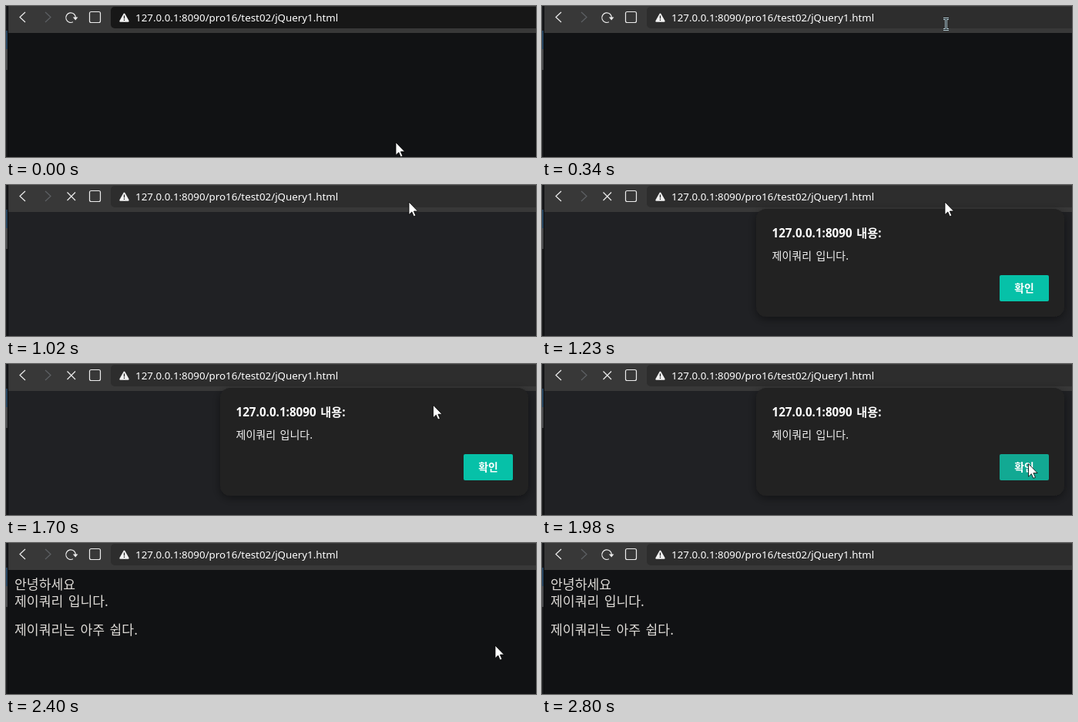
An HTML page that plays this animation: 688 by 196 pixels, repeating every 3000 ms.

```html
<!DOCTYPE html>
<html lang="ko">
<head>
<meta charset="utf-8">
<title>Alert demo</title>
<style>
  html, body { margin: 0; width: 100%; height: 100%; overflow: hidden; background: #111214; }
  svg { display: block; width: 688px; height: 196px; }
  text { font-family: "Noto Sans", "Noto Sans CJK KR", "Noto Sans CJK", sans-serif; white-space: pre; word-spacing: 1.6px; }
  .ko { font-family: "Noto Sans CJK KR", "Noto Sans CJK", sans-serif; }
  .line { fill: none; stroke: #ececec; stroke-width: 1.2; }
</style>
</head>
<body>
<svg viewBox="0 0 688 196" lang="ko">
  <defs>
    <filter id="shade" x="-10%" y="-20%" width="120%" height="150%">
      <feDropShadow dx="0" dy="3" stdDeviation="6" flood-color="#000" flood-opacity=".45"/>
    </filter>
  </defs>
  <rect id="page" width="688" height="196"/>
  <rect width="688" height="35" fill="#383838"/>

  <!-- neighbouring window edge -->
  <rect width="2" height="196" fill="#1b1c1e"/>
  <rect y="32" width="2" height="24" fill="#274560"/>
  <rect y="56" width="2" height="27" fill="#4a4b4d"/>
  <rect x="2" width="1" height="196" fill="#0b0c0d"/>

  <path class="line" d="M25 8L18 14.5L25 21"/>
  <path class="line" d="M51 8L58 14.5L51 21" style="stroke:#5d6064"/>
  <g id="reload" transform="translate(-.6 0)">
    <path class="line" d="M87.5 20.8A6.3 6.3 0 1 1 91 15"/>
    <path d="M87.4 14.6H94L90.8 18.6Z" fill="#ececec"/>
  </g>
  <path id="stop" class="line" d="M79.5 9.5L90 20M90 9.5L79.5 20"/>
  <rect class="line" x="108.5" y="7.5" width="14" height="14" rx="2"/>

  <rect id="bar" x="136" y="1" width="570" height="28" rx="5"/>
  <path d="M153.5 10.5L158.7 19.7H148.3Z" fill="#f2f2f2" stroke="#f2f2f2" stroke-width="2" stroke-linejoin="round"/>
  <path d="M153.5 12.5V16.4M153.5 17.6V19" stroke="#222" stroke-width="1.3"/>
  <text x="168" y="20" font-size="13.35" fill="#fff">127.0.0.1:8090/pro16/test02/jQuery1.html</text>

  <g id="body" font-size="17.2" fill="#dedbd7">
    <text class="ko" x="11" y="60">안녕하세요</text>
    <text class="ko" x="11" y="82">제이쿼리 입니다.</text>
    <text class="ko" x="11" y="119">제이쿼리는 아주 쉽다.</text>
  </g>

  <g id="dialog">
    <rect x="278" y="31" width="400" height="140" rx="13" fill="#222222" filter="url(#shade)"/>
    <text x="298.5" y="68" font-size="15.2" font-weight="700" fill="#fff">127.0.0.1:8090 내용:</text>
    <text class="ko" x="298.5" y="97" font-size="14" fill="#f4f4f4">제이쿼리 입니다.</text>
    <rect id="ok" x="594" y="117" width="64" height="34" rx="2"/>
    <text class="ko" x="626" y="139" font-size="13.8" font-weight="700" fill="#fff" text-anchor="middle">확인</text>
  </g>

  <path id="arrow" d="M0 0V16.6L3.8 13L6.3 18.8L8.9 17.7L6.4 12H11.6Z" fill="#fff" stroke="#000" stroke-width=".8"/>
  <g id="beam" fill="none">
    <path d="M-3.5 -7H3.5M0 -7V7M-3.5 7H3.5" stroke="#b4ccd4" stroke-width="2.8"/>
    <path d="M-3.5 -7H3.5M0 -7V7M-3.5 7H3.5" stroke="#1c2326"/>
  </g>
</svg>
<script>
const LOOP = 3000, STEP = 67;
const $ = id => document.getElementById(id);
const show = (id, on) => $(id).setAttribute('visibility', on ? 'visible' : 'hidden');
const set = (id, name, value) => $(id).setAttribute(name, value);

// Rises from 0 to 1 in n equal steps, the first one at `from`
const ramp = (t, from, n) => Math.min(1, Math.max(0, (Math.floor((t - from) / STEP) + 1) / n));
const ease = p => p < .5 ? 2 * p * p : 1 - 2 * (1 - p) ** 2;
const mix = (a, b, p) => a + (b - a) * p;

function pointer(t) {
  const up = ease(ramp(t, 70, 5));
  const down = ease(ramp(t, 1560, 8));
  const away = ramp(t, 2730, 1);
  const along = (a, b, c, d) => mix(mix(mix(a, b, up), c, down), d, away);
  return [along(506, 523, 635, 607), along(177, 22, 133, 163)];
}

function draw(t) {
  const loading = t >= 960 && t < 2190;
  set('page', 'fill', loading ? '#202124' : '#111214');
  show('reload', !loading);
  show('stop', loading);
  show('body', t >= 2190);

  // Address field: lighter under the pointer, dark while it has the focus
  const light = ramp(t, 270, 2) - ramp(t, 670, 3) + ramp(t, 960, 1);
  const grey = mix(23, 45, light);
  set('bar', 'fill', `rgb(${grey},${grey},${grey})`);

  // Dialog drops in, then lifts off and fades
  const lift = 1 - ramp(t, 1090, 3) + ramp(t, 2190, 4);
  show('dialog', lift < 1);
  set('dialog', 'opacity', 1 - lift ** 4);
  set('dialog', 'transform',
    `translate(478 ${101 - 11 * lift}) scale(${1 + .01 * lift}) translate(-478 -101)`);

  const [x, y] = pointer(t);
  const over = x > 594 && y > 117;
  set('ok', 'fill', t >= 2120 ? '#136f63' : over ? '#12a993' : '#06c1a8');

  const typing = y < 29 && t < 960;
  show('beam', typing);
  show('arrow', !typing && t < 2800);
  set('beam', 'transform', `translate(${x + 1.5} ${y + 1.5})`);
  set('arrow', 'transform', `translate(${x} ${y})`);
}

const start = performance.now();
function tick() {
  draw((performance.now() - start) % LOOP);
  requestAnimationFrame(tick);
}
draw(0);
requestAnimationFrame(tick);
</script>
</body>
</html>
```
